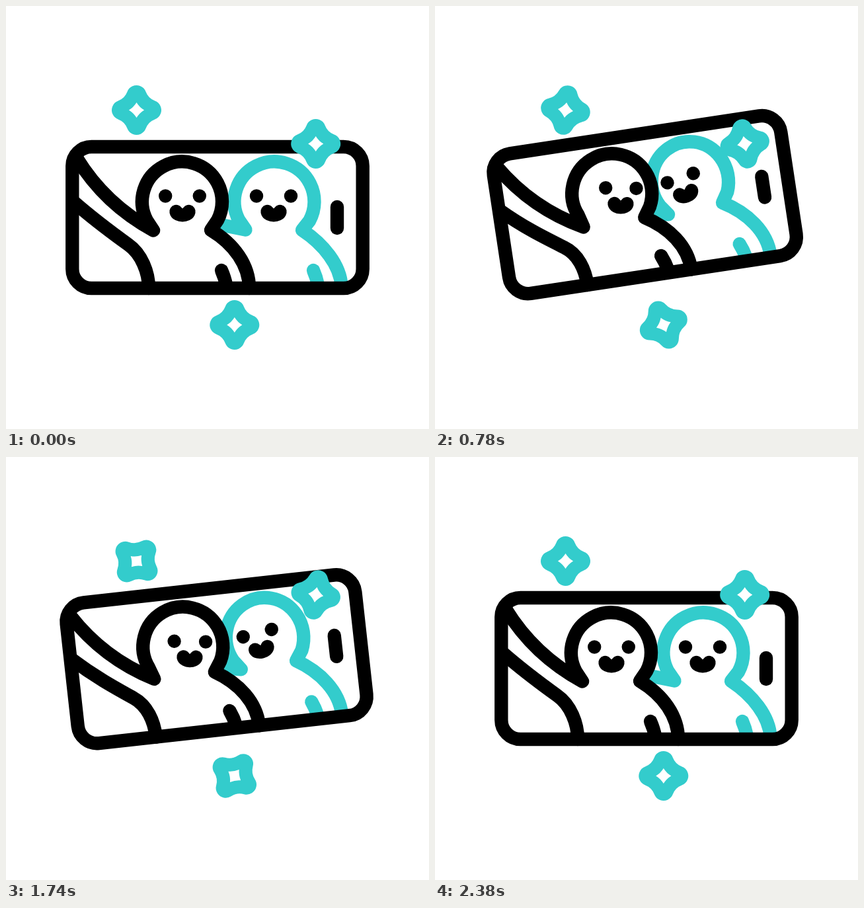
An HTML page with a canvas that plays this animation: 640x640 px, repeating every 2.4 s.

```html
<!DOCTYPE html>
<html lang="en">
<head>
<meta charset="utf-8">
<title>Selfie</title>
<style>
  html, body { margin: 0; width: 100%; height: 100%; overflow: hidden; background: #fff; }
  canvas { display: block; width: 640px; height: 640px; }
</style>
</head>
<body>
<canvas id="stage" width="640" height="640"></canvas>
<script>
const ctx = document.getElementById('stage').getContext('2d');
const LOOP = 2400, BLACK = '#000', TEAL = '#33cccc', WHITE = '#fff';
const RAD = Math.PI / 180;
const PIVOT = [190, 326];
const HEAD_R = 60.5;

const smooth = (t, a, b) => {
  const s = Math.min(1, Math.max(0, (t - a) / (b - a)));
  return s * s * (3 - 2 * s);
};

// Rises between a and b, then falls again as the mirror image in time.
const swing = (t, a, b) => smooth(t < 1190 ? t : 2380 - t, a, b);

// Monotone cubic interpolation through [time, value] keys.
function track(keys, t) {
  const last = keys.length - 1;
  if (t <= keys[0][0]) return keys[0][1];
  if (t >= keys[last][0]) return keys[last][1];
  const i = keys.findIndex(k => k[0] > t) - 1;
  const slope = j => (keys[j + 1][1] - keys[j][1]) / (keys[j + 1][0] - keys[j][0]);
  const tangent = j => {
    if (j === 0 || j === last) return 0;
    const a = slope(j - 1), b = slope(j);
    return a * b <= 0 ? 0 : 2 * a * b / (a + b);
  };
  const span = keys[i + 1][0] - keys[i][0];
  const s = (t - keys[i][0]) / span, s2 = s * s, s3 = s2 * s;
  return keys[i][1] * (2 * s3 - 3 * s2 + 1) + keys[i + 1][1] * (3 * s2 - 2 * s3)
    + span * (tangent(i) * (s3 - 2 * s2 + s) + tangent(i + 1) * (s3 - s2));
}

const SPARKLES = [
  { x: 197.5, y: 157.5, turn: [[440, 0], [780, 8], [1420, 163], [1740, 311], [2060, 352], [2260, 360]] },
  { x: 468.7, y: 208.5, turn: [[0, 0], [320, -57], [780, -190], [1420, -315], [1740, -351], [1900, -360]] },
  { x: 345.8, y: 482.5, turn: [[180, 0], [320, -10], [780, -111], [1420, -228], [1740, -324], [2060, -360]] }
];

function strokePath(color, build) {
  ctx.strokeStyle = color;
  ctx.beginPath();
  build();
  ctx.stroke();
}

function sparkle(x, y, degrees) {
  const lobe = 22.5, lobeR = 15, valley = 36.35, valleyR = 23.9, lean = 20.9 * RAD;
  ctx.save();
  ctx.translate(x, y);
  ctx.rotate(degrees * RAD);
  ctx.fillStyle = TEAL;
  ctx.beginPath();
  for (let i = 0; i < 4; i++) {
    const q = i * Math.PI / 2, c = Math.cos(q), s = Math.sin(q);
    ctx.arc(lobe * s, -lobe * c, lobeR, q - Math.PI + lean, q - lean);
    ctx.arc(valley * (c + s), valley * (s - c), valleyR,
      q + Math.PI - lean, q + Math.PI / 2 + lean, true);
  }
  ctx.fill();
  const tip = 11.6, dip = 4.4;
  ctx.fillStyle = WHITE;
  ctx.beginPath();
  ctx.moveTo(0, -tip);
  ctx.quadraticCurveTo(dip, -dip, tip, 0);
  ctx.quadraticCurveTo(dip, dip, 0, tip);
  ctx.quadraticCurveTo(-dip, dip, -tip, 0);
  ctx.quadraticCurveTo(-dip, -dip, 0, -tip);
  ctx.fill();
  ctx.restore();
}

function face(x, y, degrees, eyeGap) {
  ctx.save();
  ctx.translate(x, y);
  ctx.rotate(degrees * RAD);
  ctx.fillStyle = BLACK;
  for (const side of [-1, 1]) {
    ctx.beginPath();
    ctx.arc(side * eyeGap, -25.5, 10.2, 0, 2 * Math.PI);
    ctx.fill();
  }
  strokePath(BLACK, () => {
    ctx.moveTo(-9.5, -2);
    ctx.bezierCurveTo(-8, 5, 8, 5, 9.5, -2);
  });
  ctx.restore();
}

// Arc of the head between the two neck corners.
function headArc(cx, cy, rx, left, right) {
  const angle = p => Math.atan2((p[1] - cy) / HEAD_R, (p[0] - cx) / rx);
  ctx.lineTo(...left);
  ctx.ellipse(cx, cy, rx, HEAD_R, 0, angle(left) + 0.3, angle(right) - 0.3);
  ctx.lineTo(...right);
}

function backFriend(k) {
  const dx = -14 * k;
  strokePath(TEAL, () => {
    ctx.moveTo(300 - 11 * k, 326 + 1.5 * k);
    headArc(406 - 15 * k, 296 - 0.5 * k, HEAD_R - 2.7 * k,
      [362.5 - 11 * k, 338.5 + 1.5 * k], [448 - 13 * k, 339 - 5 * k]);
    ctx.bezierCurveTo(480 - 10 * k, 360 - 6 * k, 506 - 10 * k, 392 - 5 * k, 507.5 - 12.5 * k, 424);
  });
  strokePath(TEAL, () => {
    ctx.moveTo(465 + dx, 400);
    ctx.quadraticCurveTo(469.5 + dx, 410, 472 + dx, 422);
  });
  face(405 - 23.8 * k, 313, -12.8 * k, 26 - 5.8 * k);
}

function frontFriend(k) {
  const dx = 7 * k;
  ctx.fillStyle = WHITE;
  strokePath(BLACK, () => {
    ctx.moveTo(107, 230);
    ctx.quadraticCurveTo(150, 300, 223, 339.5);
    headArc(266.5 + dx, 296, HEAD_R, [223, 339.5], [310 + dx, 339]);
    ctx.bezierCurveTo(345 + dx, 360, 368 + dx, 392, 368 + dx, 427);
    ctx.fill();
  });
  strokePath(BLACK, () => {
    ctx.moveTo(102, 296);
    ctx.bezierCurveTo(134, 324 + 3 * k, 160 + 3 * k, 343 + 4 * k, 185 + 5 * k, 361 + 5 * k);
    ctx.bezierCurveTo(205 + 4 * k, 375 + 4 * k, 216, 403, 216, 427);
  });
  strokePath(BLACK, () => {
    ctx.moveTo(326 + dx, 400);
    ctx.quadraticCurveTo(331 + dx, 411, 333.5 + dx, 424);
  });
  face(267 + 17.5 * k, 313 + 2 * k, 10 * k, 25.8 - 2.8 * k);
}

function phone(t) {
  ctx.save();
  ctx.translate(...PIVOT);
  ctx.rotate(-10 * swing(t, 170, 970) * RAD);
  ctx.translate(-PIVOT[0], -PIVOT[1]);
  ctx.fillStyle = WHITE;
  ctx.beginPath();
  ctx.roundRect(100.3, 213, 439.4, 214, 29);
  ctx.fill();
  backFriend(swing(t, 180, 940));
  frontFriend(swing(t, 200, 870));
  strokePath(BLACK, () => ctx.roundRect(100.3, 213, 439.4, 214, 29));
  strokePath(BLACK, () => {
    ctx.moveTo(501, 304);
    ctx.lineTo(501, 336);
  });
  ctx.restore();
}

function draw(now) {
  const t = now % LOOP;
  ctx.fillStyle = WHITE;
  ctx.fillRect(0, 0, 640, 640);
  ctx.lineWidth = 20.4;
  ctx.lineCap = ctx.lineJoin = 'round';
  phone(t);
  for (const s of SPARKLES) sparkle(s.x, s.y, track(s.turn, t));
}

let start;
function tick(now) {
  start ??= now;
  draw(now - start);
  requestAnimationFrame(tick);
}
draw(0);
requestAnimationFrame(tick);
</script>
</body>
</html>
```
